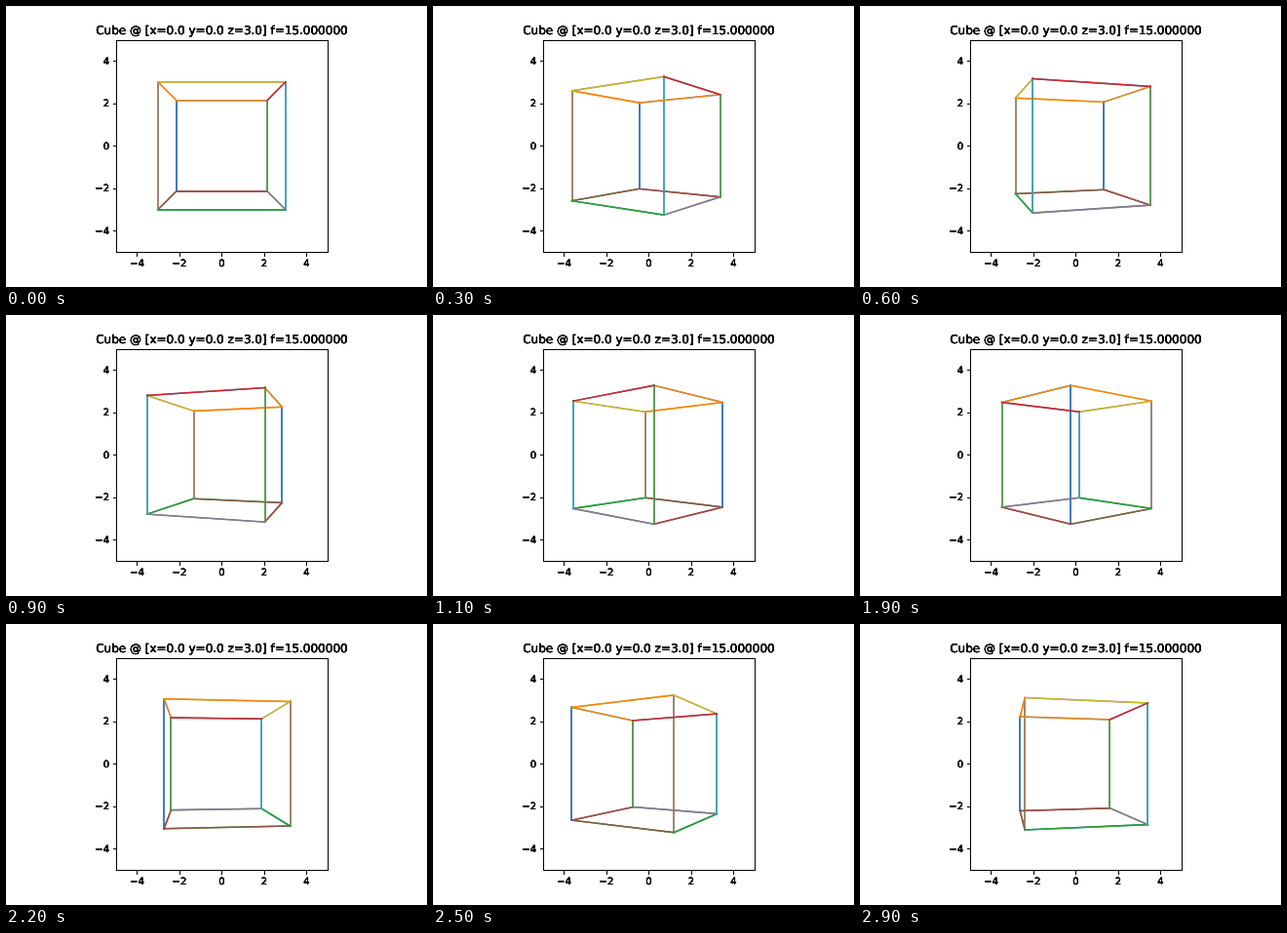
An HTML page with a canvas that plays this animation: 432x288 px, repeating every 3000 ms.

```html
<!DOCTYPE html>
<html lang="en">
<head>
<meta charset="utf-8">
<title>Rotating cube</title>
<style>
  html, body { margin: 0; width: 100%; height: 100%; overflow: hidden; background: #fff; }
  canvas { display: block; }
</style>
</head>
<body>
<canvas id="stage" width="432" height="288"></canvas>
<script>
const ctx = document.getElementById('stage').getContext('2d');
const COLORS = ['#1f77b4', '#ff7f0e', '#2ca02c', '#d62728', '#9467bd',
                '#8c564b', '#e377c2', '#7f7f7f', '#bcbd22', '#17becf'];
const STEPS = 30, STEP_MS = 100;
const FOCAL = 15, DISTANCE = 3;
const UNIT = 21.744;
const toX = x => 221.4 + x * UNIT;
const toY = y => 143.28 - y * UNIT;

// Repeated drawing hardens the antialiased edges of the glyphs.
function label(text, x, y, size, align) {
  ctx.font = `${size}px "DejaVu Sans", sans-serif`;
  ctx.textAlign = align;
  for (let i = 0; i < 6; i++) ctx.fillText(text, x, y);
}

function drawAxes() {
  ctx.fillStyle = ctx.strokeStyle = '#000';
  ctx.lineWidth = 1;
  ctx.strokeRect(113.5, 35.5, 217, 217);
  label('Cube @ [x=0.0 y=0.0 z=3.0] f=15.000000', 221.4, 29, 12, 'center');
  for (let v = -4; v <= 4; v += 2) {
    const text = String(v).replace('-', '\u2212');
    const x = toX(v), y = toY(v);
    ctx.fillRect(Math.round(x), 253, 1, 4);
    ctx.fillRect(110, Math.round(y), 3, 1);
    label(text, x, 267, 10, 'center');
    label(text, 106, Math.round(y + 3.65), 10, 'right');
  }
}

// Corner bits: 4 = right, 2 = top, 1 = far.
function project(corner, angle) {
  const x = corner & 4 ? 0.5 : -0.5;
  const y = corner & 2 ? 0.5 : -0.5;
  const z = corner & 1 ? 0.5 : -0.5;
  const cos = Math.cos(angle), sin = Math.sin(angle);
  const scale = FOCAL / (DISTANCE + x * sin + z * cos);
  return [toX((x * cos - z * sin) * scale), toY(y * scale)];
}

function drawEdge(a, b, color) {
  // Upright and level edges sit on whole pixels.
  if (a.some((v, i) => Math.abs(v - b[i]) < 1e-4)) {
    a = a.map(Math.round);
    b = b.map(Math.round);
  }
  ctx.strokeStyle = color;
  ctx.beginPath();
  ctx.moveTo(...a);
  ctx.lineTo(...b);
  ctx.stroke();
}

// Every corner draws its three edges, so each edge is painted twice.
function drawCube(angle) {
  ctx.lineWidth = 1.5;
  ctx.lineCap = 'square';
  let count = 0;
  for (let corner = 0; corner < 8; corner++) {
    for (const axis of [4, 2, 1]) {
      drawEdge(project(corner, angle), project(corner ^ axis, angle), COLORS[count++ % 10]);
    }
  }
}

function render(now) {
  const step = Math.floor(now / STEP_MS) % STEPS;
  ctx.fillStyle = '#fff';
  ctx.fillRect(0, 0, 432, 288);
  drawAxes();
  drawCube(-2 * Math.PI * step / STEPS);
  requestAnimationFrame(render);
}

ctx.textRendering = 'geometricPrecision';
render(0);
</script>
</body>
</html>
```
